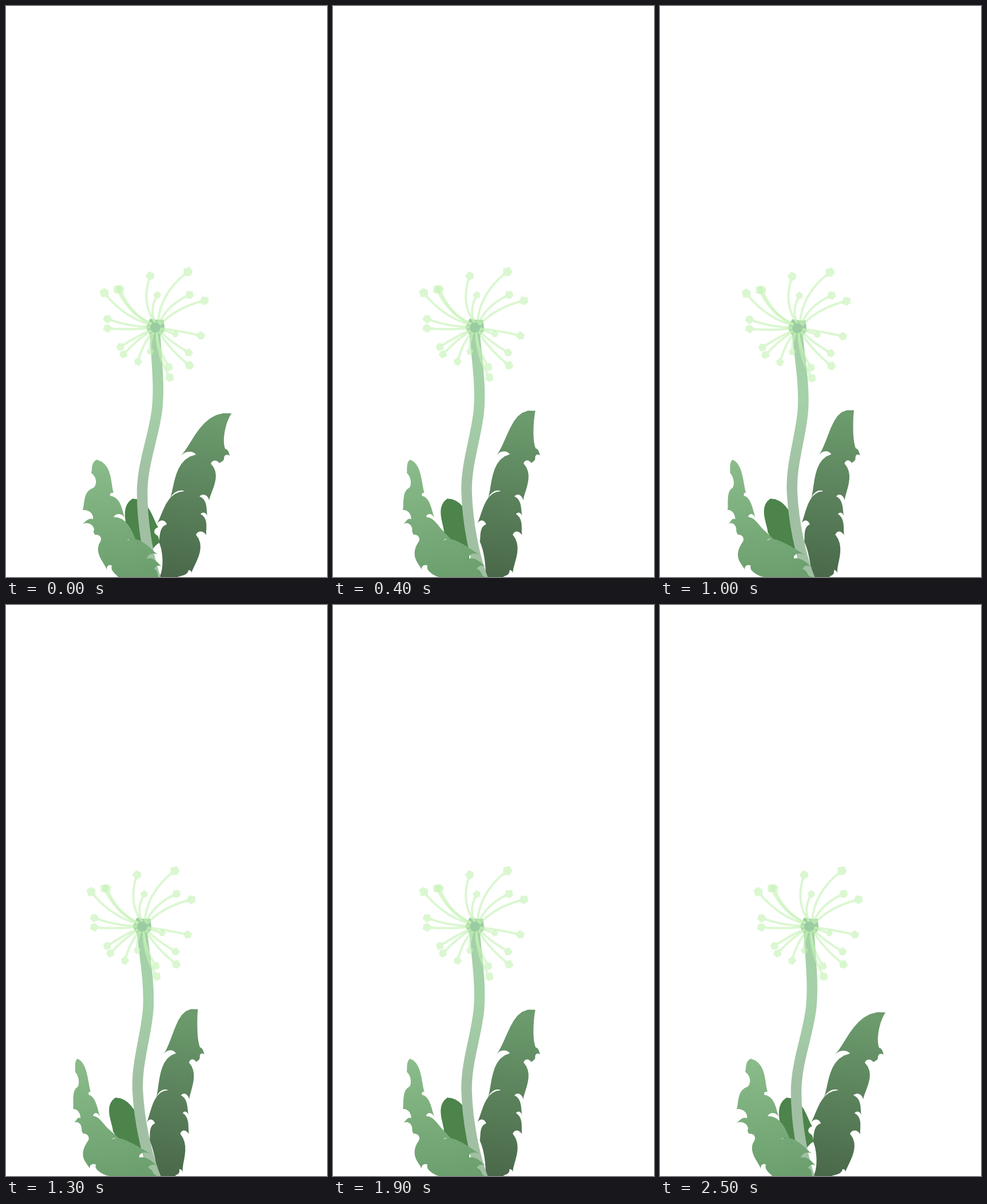
These frames come from a looping animation (561 by 998 pixels, 2600 ms). An HTML page:

```html
<!DOCTYPE html>
<html lang="en">
<head>
<meta charset="utf-8">
<title>Dandelion</title>
<style>
html, body { margin: 0; width: 100%; height: 100%; overflow: hidden; background: #fff; }
svg { display: block; width: 100vw; height: 100vh; }
</style>
</head>
<body>
<svg id="stage" viewBox="0 0 561 998">
  <defs>
    <linearGradient id="gLeft" gradientUnits="userSpaceOnUse" x1="170" y1="790" x2="200" y2="998">
      <stop offset="0" stop-color="#8bbc8b"/><stop offset="1" stop-color="#6b9f6d"/>
    </linearGradient>
    <linearGradient id="gRight" gradientUnits="userSpaceOnUse" x1="345" y1="720" x2="300" y2="998">
      <stop offset="0" stop-color="#6c9b6d"/><stop offset="1" stop-color="#4a694a"/>
    </linearGradient>
    <linearGradient id="gStem" gradientUnits="userSpaceOnUse" x1="0" y1="690" x2="0" y2="830">
      <stop offset="0" stop-color="#a4d1a8"/><stop offset="1" stop-color="#a1c0a3"/>
    </linearGradient>
  </defs>
</svg>
<script>
const stage = document.getElementById('stage');
const GROUND = 998, LOOP = 2600, FIRST = 100, HOLD = 300;
const HEAD = { x: 261, y: 562 };

// How far the plant leans and how far the head drops at each step.
const STEPS = [[0, 0], [.3, -4], [.65, 0], [.95, 6], [.93, 1], [1, 0], [.8, 3], [.65, 0], [.3, -3]];

// Each side runs from the apex down: tooth, notch, tooth, notch ...
const pairs = s => s.split(' ').map(p => p.split(',').map(Number));
const smooth = (a, b, v) => {
  const t = Math.min(1, Math.max(0, (v - a) / (b - a)));
  return t * t * (3 - 2 * t);
};

const LEAVES = [
  {
    fill: '#4c844b', height: 137, curl: 0,
    right: pairs('221,861 266,911 262,924 268,938 250,975'),
    left: pairs('221,861 211,920 212,970'),
    lean: s => 30 * s ** .8,
    spine: () => 0,
    squeeze: () => 0
  },
  {
    fill: 'url(#gRight)', height: 286, curl: 14,
    right: pairs('394,712 394,712 383,774 391,786 381,790 373,799 358,800 355,864 338,857 352,892 340,888 350,925 332,924 323,994 319,986 300,998'),
    left: pairs('394,712 306,786 332,784 286,862 312,848 264,904 281,906 267,936 268,998'),
    lean: s => 40 * s,
    spine: u => 285 + 80 * u,
    squeeze: () => -.004
  },
  {
    fill: 'url(#gLeft)', height: 205, curl: 0,
    right: pairs('159,793 188,851 182,856 208,895 188,893 232,943 211,934 267,960 246,966 275,983 259,984 266,998'),
    left: pairs('159,793 149,816 153,842 134,881 152,897 134,905 154,916 155,924 165,936 176,985 185,978 196,998'),
    lean: s => 38 * s ** .8,
    spine: u => 265 - 95 * Math.min(1, 2.5 * u),
    squeeze: u => .006 - .016 * smooth(.1, .5, u)
  }
];

// Seeds as [degrees clockwise from up, stalk length].
const SEEDS = pairs('30,112 -6,90 -56,107 -45,93 -43,90 3,56 46,82 61,97 -80,84 -91,83 -119,69 -130,72 -153,66 -168,42 161,72 164,90 138,88 127,72 100,80 108,36');

function add(tag, attrs, parent = stage) {
  const el = document.createElementNS('http://www.w3.org/2000/svg', tag);
  for (const k in attrs) el.setAttribute(k, attrs[k]);
  return parent.appendChild(el);
}

// Points of a cubic from p to q; each handle is [part of the way, offset outwards].
function arc(p, q, h1, h2, out) {
  const dx = q[0] - p[0], dy = q[1] - p[1];
  const at = ([f, o]) => [p[0] + f * dx + out * o * dy, p[1] + f * dy - out * o * dx];
  const a = at(h1), b = at(h2), pts = [];
  for (let t = 0; t < 1; t += .1) {
    const m = 1 - t;
    pts.push([0, 1].map(i =>
      m ** 3 * p[i] + 3 * m * m * t * a[i] + 3 * m * t * t * b[i] + t ** 3 * q[i]));
  }
  return pts;
}

// A lobe swells towards its tooth, then a rounded bite leads to the next notch.
function side(points, out) {
  return points.slice(1).flatMap((q, i) => {
    const p = points[i];
    if (i % 2 === 0) return arc(p, q, [.3, .33], [.75, .03], out);
    const bite = -Math.min(.45, 8 / Math.hypot(q[0] - p[0], q[1] - p[1]));
    return arc(p, q, [.3, bite], [.8, bite], out);
  }).concat([points[points.length - 1]]);
}

function bend([x, y], leaf, sway) {
  const u = Math.max(0, (GROUND - y) / leaf.height);
  const lean = leaf.lean(sway), mid = leaf.spine(u);
  const curl = leaf.curl * Math.sqrt(sway) * u ** 8;
  const nx = mid + (x - mid) * (1 + lean * leaf.squeeze(u)) - lean * u ** .4 - curl;
  return [nx, y - curl * .4];
}

for (const leaf of LEAVES) {
  leaf.outline = [...side(leaf.right, 1), ...side(leaf.left, -1).reverse()];
}

const [back, right] = LEAVES.slice(0, 2).map(l => add('path', { fill: l.fill }));
const stem = add('path', {
  d: 'M260,565C262,610 269,660 264,705S238,800 238,850S247,960 262,1002',
  fill: 'none', stroke: 'url(#gStem)', 'stroke-width': 18.5
});
const left = add('path', { fill: LEAVES[2].fill });
const blades = [back, right, left];

// The head is drawn once around its own centre.
const head = add('g', {});
add('path', {
  d: 'M-9,-15L2,-13 14,-13 16,5 7,15 -8,14 -16,0Z',
  fill: '#9bcca1', stroke: '#9bcca1', 'stroke-linejoin': 'round'
}, head);
for (const [deg, r] of SEEDS) {
  const a = deg * Math.PI / 180, bow = -.05 - .18 * Math.cos(a);
  const x = r * Math.sin(a), y = -r * Math.cos(a);
  const cx = x / 2 - y * bow, cy = y / 2 + x * bow;
  const turn = Math.atan2(y - cy, x - cx) * 180 / Math.PI;
  const g = add('g', { opacity: .62 }, head);
  add('path', {
    d: `M${x / r * 9},${y / r * 9}Q${cx},${cy} ${x},${y}`,
    fill: 'none', stroke: '#c6f3b6', 'stroke-width': 4
  }, g);
  add('path', {
    d: 'M7,-3L6,4 0,6.5 -7,1 -1,-6.5Z',
    fill: '#c6f3b6', stroke: '#c6f3b6', 'stroke-width': 2, 'stroke-linejoin': 'round',
    transform: `translate(${x} ${y}) rotate(${turn}) scale(${.65 + r / 230})`
  }, g);
}

function draw([sway, drop]) {
  LEAVES.forEach((leaf, i) => {
    const pts = leaf.outline.map(p => bend(p, leaf, sway));
    blades[i].setAttribute('d', `M${pts.join('L')}Z`);
  });
  const shift = 23 * sway ** 1.3;
  const skew = Math.atan(shift / (GROUND - HEAD.y)) * 180 / Math.PI;
  stem.setAttribute('transform', `translate(0 ${GROUND}) skewX(${skew}) translate(0 ${-GROUND})`);
  head.setAttribute('transform', `translate(${HEAD.x - shift} ${HEAD.y + drop})`);
}

let shown = -1;
function tick() {
  const t = performance.now() % LOOP;
  const step = (Math.floor((t - FIRST) / HOLD) + 1) % STEPS.length;
  if (step !== shown) draw(STEPS[shown = step]);
  requestAnimationFrame(tick);
}
tick();
</script>
</body>
</html>
```
